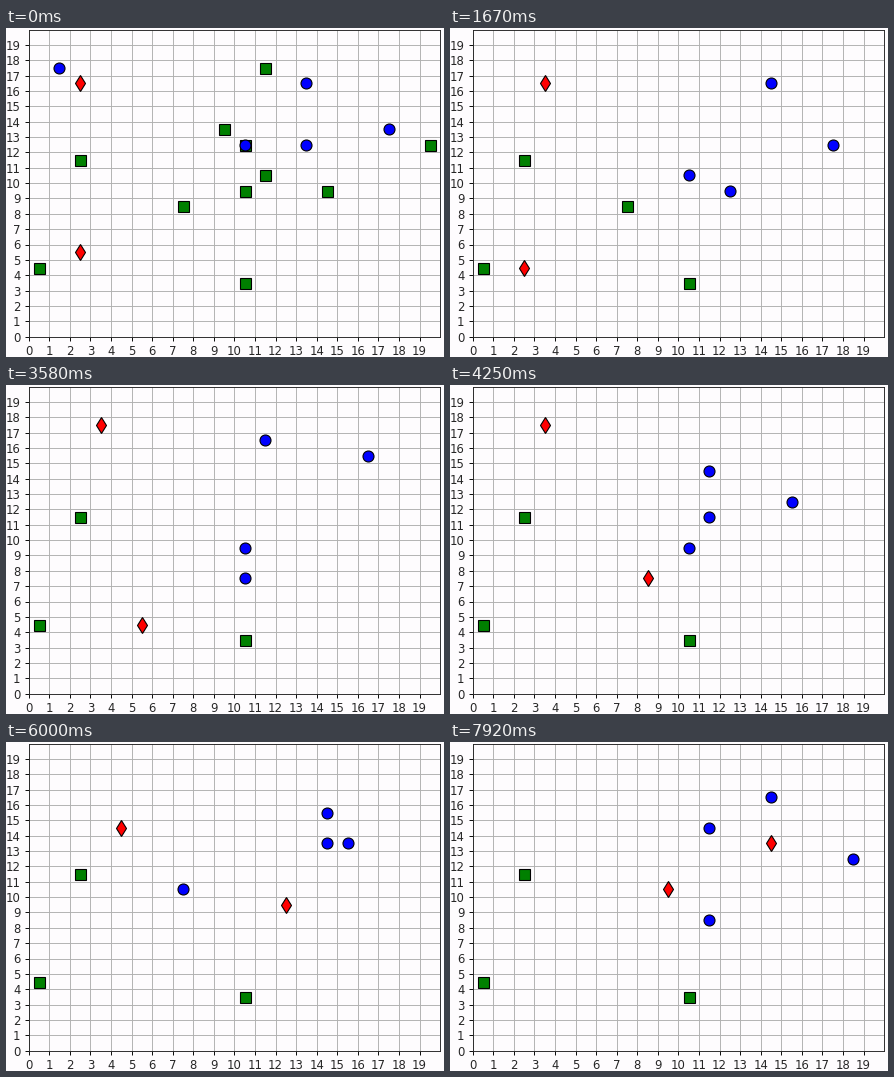
Animation of 438x329 px, one loop 8000 ms. Source, as a matplotlib script:

```python
import random
from itertools import product

import numpy as np
import matplotlib.pyplot as plt
from matplotlib.animation import FuncAnimation

W, H, DPI = 438, 329, 100
PT = 72 / DPI          # points per pixel
TICKS = 96
CELLS = 20
BG = "#fefcfe"

FOOD = [(11, 17), (9, 13), (10, 12), (2, 11), (11, 10), (10, 9), (14, 9),
        (7, 8), (0, 4), (19, 12), (10, 3)]
STRAY = (1, 17)        # prey caught at the start

# Every walker passes its stops at these steps and wanders in between
STOP_STEPS = [0, 6, 11, 16, 19, 23, 26]
PREY = [
    [(10, 12), (10, 10), (9, 7), (10, 9), (8, 12), (8, 10), (11, 8)],
    [(13, 16), (14, 16), (12, 16), (11, 14), (12, 15), (16, 16), (14, 16)],
    [(13, 12), (12, 9), (11, 9), (11, 11), (13, 11), (14, 15), (11, 14)],
    [(17, 13), (17, 12), (16, 14), (15, 12), (15, 13), (17, 13), (18, 12)],
]
HUNTERS = [
    [(2, 16), (3, 16), (4, 17), (3, 17), (2, 15), (6, 13), (9, 10)],
    [(2, 5), (2, 4), (5, 3), (8, 7), (10, 9), (14, 11), (14, 13)],
]


def dist(a, b):
    """Number of moves between two cells, diagonals allowed."""
    return max(abs(a[0] - b[0]), abs(a[1] - b[1]))


def toward(pos, goal):
    return tuple(p + (g > p) - (g < p) for p, g in zip(pos, goal))


def wander(pos, goal, left, rng):
    """Random move that still allows reaching the goal in time."""
    moves = [(pos[0] + dx, pos[1] + dy)
             for dx, dy in product((-1, 0, 1), repeat=2)]
    return rng.choice([m for m in moves if dist(m, goal) < left
                       and 0 <= min(m) and max(m) < CELLS])


def walk(stops, wanted, eaten, rng):
    """Cells of a walker at every step, with detours to eat on the way."""
    path = [stops[0]]
    for goal, end in zip(stops[1:], STOP_STEPS[1:]):
        while len(path) <= end:
            pos, left = path[-1], end + 1 - len(path)
            if pos in wanted:
                wanted.remove(pos)
                eaten[pos] = max(len(path) - 1, 1)
            near = [c for c in wanted if dist(pos, c) + dist(c, goal) <= left]
            if near:
                path.append(toward(pos, min(near, key=lambda c: dist(pos, c))))
            else:
                path.append(wander(pos, goal, left, rng))
    return path


def run(walkers, items, rng):
    """Walk everyone; each item belongs to the walker starting nearest."""
    eaten = {}
    owner = {c: min(range(len(walkers)), key=lambda i: dist(walkers[i][0], c))
             for c in items}
    paths = [walk(stops, [c for c in items if owner[c] == i], eaten, rng)
             for i, stops in enumerate(walkers)]
    return paths, eaten


rng = random.Random(4)
prey, food_eaten = run(PREY, FOOD, rng)
hunters, prey_eaten = run(HUNTERS, [STRAY], rng)

# The steps slow down gradually
k = np.arange(STOP_STEPS[-1] + 1)
STEP_TICKS = k * (2.62 + 0.034 * k)

fig = plt.figure(figsize=(W / DPI, H / DPI), dpi=DPI, facecolor=BG)
ax = fig.add_axes([22.6 / W, 20.4 / H, 411.6 / W, 307 / H], facecolor=BG)
ax.set(xlim=(0, CELLS), ylim=(0, CELLS),
       xticks=range(CELLS), yticks=range(CELLS))
ax.tick_params(length=4 * PT, pad=4 * PT, width=0.93 * PT,
               labelsize=11.6 * PT, labelcolor="#262626",
               labelfontfamily="DejaVu Sans")
ax.grid(color="#b0b0b0", linewidth=0.93 * PT)
ax.set_axisbelow(True)
for spine in ax.spines.values():
    spine.set(linewidth=0.93 * PT, edgecolor="#262626")


def group(marker, color):
    return ax.plot([], [], marker, color=color, markersize=11 * PT,
                   markeredgecolor="black", markeredgewidth=1.1 * PT,
                   snap=False)[0]


food_dots = group("s", "green")
prey_dots = group("o", "blue")
hunter_dots = group("d", "red")


def place(dots, cells):
    dots.set_data(*(np.array(cells).T + 0.5))


def update(tick):
    step = np.searchsorted(STEP_TICKS, tick, side="right") - 1
    alive = [path[step] for path in prey]
    if step < prey_eaten[STRAY]:
        alive.append(STRAY)
    place(food_dots, [c for c in FOOD if step < food_eaten.get(c, TICKS)])
    place(prey_dots, alive)
    place(hunter_dots, [path[step] for path in hunters])
    return food_dots, prey_dots, hunter_dots


anim = FuncAnimation(fig, update, frames=TICKS, interval=8000 / TICKS,
                     repeat=True, repeat_delay=0)
plt.show()
```
